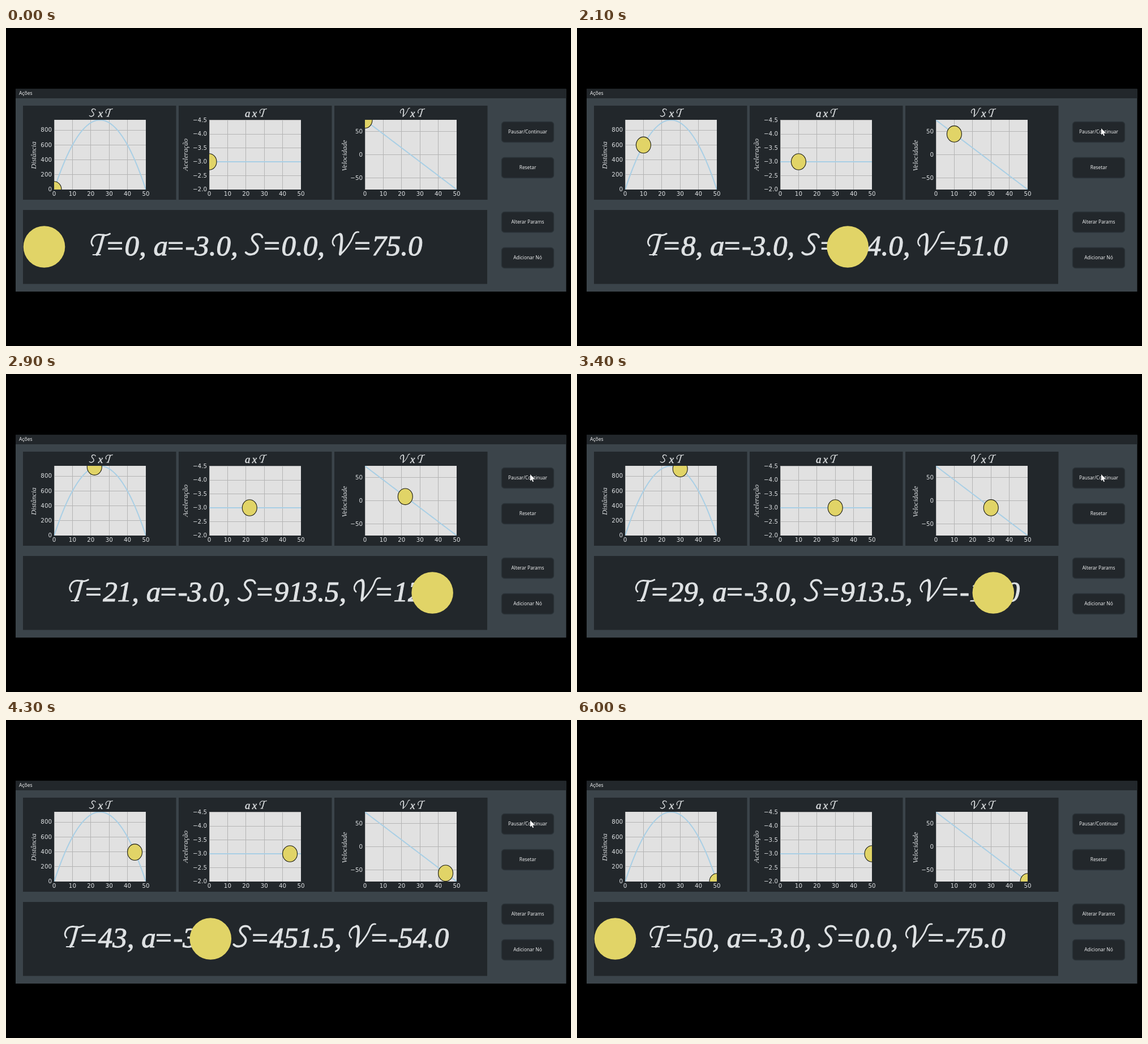
An HTML page with a canvas that plays this animation: 998 px wide and 561 px high, repeating every 6.1 s.

```html
<!DOCTYPE html>
<html lang="pt">
<head>
<meta charset="utf-8">
<title>Movimento uniformemente variado</title>
<style>
html, body { margin: 0; width: 100%; height: 100%; overflow: hidden; background: #000; }
canvas { display: block; }
</style>
</head>
<body>
<canvas id="stage" width="998" height="561"></canvas>
<script>
const ctx = document.getElementById('stage').getContext('2d');
const LOOP = 6100, STEP = 100, END = 50;
const DARK = '#22272b', SLATE = '#3b444a', INK = '#dee1e3', BRIGHT = '#f6f7f8', YELLOW = '#e1d467';
const SERIF = '"Liberation Serif", "Times New Roman", serif';
const SCRIPT = `italic 51px ${SERIF}`;
const TICK = '10.3px "DejaVu Sans", sans-serif';
const UI = '"Open Sans", "Noto Sans", sans-serif';

const distance = T => 75 * T - 1.5 * T * T;
const speed = T => 75 - 3 * T;
const accel = () => -3;

const plots = [
  { panel: 30, x: 85, title: 'S x T', titleX: 147, label: 'Distância', labelX: 53, labelY: 224.5,
    f: distance, y: v => 285 - v * 0.1309, ticks: [0, 200, 400, 600, 800], digits: 0 },
  { panel: 305, x: 359, title: 'a x T', titleX: 422, label: 'Aceleração', labelX: 321, labelY: 223.5,
    f: accel, y: v => 236 + (v + 3) * 49, ticks: [-2, -2.5, -3, -3.5, -4, -4.5], digits: 1 },
  { panel: 580, x: 634, title: 'V x T', titleX: 696, label: 'Velocidade', labelX: 602, labelY: 225,
    f: speed, y: v => 223.7 - v * 0.8173, ticks: [-50, 0, 50], digits: 0 }
];
const AX = { top: 162, w: 162, h: 123 };
const px = (p, T) => p.x + T * AX.w / END;

// Swash capitals around a baseline at 0: stroke width and path pairs.
const swash = {
  T: [[3, 'M4 -17C-2 -22 3 -36 14 -36.5C22 -37 26 -33 34 -38'],
      [4.6, 'M23 -35C18 -24 18 -9 11 -1.5'], [2, 'M4 -1H17']],
  S: [[3.8, 'M30 -32C28 -40 13 -39 12 -30C12 -22 24 -20 22 -11C20 -1 6 1 1 -5']],
  V: [[2.8, 'M4 -17C-3 -23 4 -37 15 -37'],
      [4.8, 'M14 -37C20 -37 16 -15 14.5 -2'],
      [2.8, 'M14 -1C24 -9 34 -24 37 -33C39 -39 42 -42 47 -41']]
};
for (const key in swash) swash[key] = swash[key].map(([w, d]) => [w, new Path2D(d)]);
const lead = { T: 25.5, a: 21.5, S: 29.5, V: 36 };

function rect(x, y, w, h, color) {
  ctx.fillStyle = color;
  ctx.fillRect(x, y, w, h);
}

function text(str, x, y, font, align = 'left', base = 'middle', color = INK) {
  ctx.font = font;
  ctx.textAlign = align;
  ctx.textBaseline = base;
  ctx.fillStyle = color;
  ctx.fillText(str, x, y);
}

const runs = str => str.match(/[TaSV]|[^TaSV]+/g);

function runWidth(run) {
  ctx.font = SCRIPT;
  return lead[run] || ctx.measureText(run).width;
}

const scriptWidth = str => runs(str).reduce((sum, r) => sum + runWidth(r), 0);

function script(str, x, y, scale = 1) {
  ctx.save();
  ctx.translate(x, y);
  ctx.scale(scale, scale);
  ctx.strokeStyle = INK;
  ctx.lineCap = ctx.lineJoin = 'round';
  for (const r of runs(str)) {
    if (swash[r]) {
      for (const [w, path] of swash[r]) {
        ctx.lineWidth = w;
        ctx.stroke(path);
      }
    } else {
      text(r, 0, 0, SCRIPT, 'left', 'alphabetic');
      ctx.lineWidth = 1.1;
      ctx.strokeText(r, 0, 0);
    }
    ctx.translate(runWidth(r), 0);
  }
  ctx.restore();
}

function line(x1, y1, x2, y2) {
  ctx.beginPath();
  ctx.moveTo(x1, y1);
  ctx.lineTo(x2, y2);
  ctx.stroke();
}

function drawPlot(p, mark) {
  const bottom = AX.top + AX.h;
  rect(p.panel, 137, 270.5, 166, DARK);
  script(p.title, p.titleX, 156.5, 0.37);

  ctx.save();
  ctx.translate(p.labelX, p.labelY);
  ctx.rotate(-Math.PI / 2);
  text(p.label, 0, 0, `italic 12.5px ${SERIF}`, 'center', 'alphabetic');
  ctx.restore();

  rect(p.x, AX.top, AX.w, AX.h, '#e1e1e1');
  ctx.save();
  ctx.beginPath();
  ctx.rect(p.x, AX.top, AX.w, AX.h);
  ctx.clip();
  ctx.strokeStyle = '#b4b4b4';
  ctx.lineWidth = 1;
  for (let T = 0; T <= END; T += 10) {
    const x = Math.floor(px(p, T)) + 0.5;
    line(x, AX.top, x, bottom);
  }
  for (const v of p.ticks) {
    const y = Math.floor(p.y(v)) + 0.5;
    line(p.x, y, p.x + AX.w, y);
  }
  ctx.strokeStyle = '#a9cfe5';
  ctx.lineWidth = 2;
  ctx.beginPath();
  for (let T = 0; T <= END; T++) ctx.lineTo(px(p, T), p.y(p.f(T)));
  ctx.stroke();
  if (mark !== null) {
    ctx.beginPath();
    ctx.ellipse(px(p, mark), p.y(p.f(mark)), 13, 14.3, 0, 0, 7);
    ctx.fillStyle = YELLOW;
    ctx.fill();
    ctx.strokeStyle = '#1c1c14';
    ctx.lineWidth = 1.1;
    ctx.stroke();
  }
  ctx.restore();

  for (let T = 0; T <= END; T += 10) text(T, px(p, T), 293.5, TICK, 'center');
  for (const v of p.ticks) {
    text(v.toFixed(p.digits).replace('-', '−'), p.x - 4, p.y(v) + 0.5, TICK, 'right');
  }
}

function drawButton(label, y) {
  ctx.beginPath();
  ctx.roundRect(875.5, y + 0.5, 92, 36, 5);
  ctx.fillStyle = DARK;
  ctx.fill();
  ctx.strokeStyle = '#2b3338';
  ctx.lineWidth = 1.4;
  ctx.stroke();
  text(label, 921.5, y + 18.8, `500 8.4px ${UI}`, 'center', 'middle', BRIGHT);
}

function drawCursor() {
  ctx.fillStyle = '#fff';
  ctx.fill(new Path2D('M926 177V188.5L928.6 186.2L930.3 190.2L932 189.4L930.3 185.6H933.6Z'));
}

// The ball runs one step ahead of the readout; plot markers move every second step.
function stateAt(t) {
  const running = t >= 1600;
  const T = running ? Math.min(END, Math.round(8 + (t - 2100) * 0.016)) : 0;
  const ballT = running ? Math.min(END, T + 1) : 0;
  const cleared = t >= 1400 && !running;
  const mark = cleared ? null : 2 * Math.ceil(ballT / 2);
  return { T, ballT, mark, cursor: t >= 1500 && t < 5000 };
}

function draw(t) {
  const s = stateAt(t);
  rect(0, 0, 998, 561, '#000');
  rect(17, 107.5, 972.5, 357.5, SLATE);
  rect(17, 107.5, 972.5, 16.5, DARK);
  text('Ações', 23, 116, `500 8.6px ${UI}`, 'left', 'middle', BRIGHT);
  for (const p of plots) drawPlot(p, s.mark);

  rect(30, 321, 820, 130.5, DARK);
  const V = speed(s.T).toFixed(1), S = distance(s.T).toFixed(1);
  const readout = `T=${s.T}, a=-3.0, S=${S}, V=${V}`;
  script(readout, 442.5 - scriptWidth(readout) / 2, 401);

  ctx.beginPath();
  ctx.arc(67.5 + distance(s.ballT) * 0.742, 386, 36.8, 0, 7);
  ctx.fillStyle = YELLOW;
  ctx.fill();

  drawButton('Pausar/Continuar', 165);
  drawButton('Resetar', 228);
  drawButton('Alterar Params', 324);
  drawButton('Adicionar Nó', 387);
  if (s.cursor) drawCursor();
}

const start = performance.now();
function tick() {
  const t = (performance.now() - start) % LOOP;
  draw(Math.floor(t / STEP) * STEP);
  requestAnimationFrame(tick);
}
tick();
</script>
</body>
</html>
```
